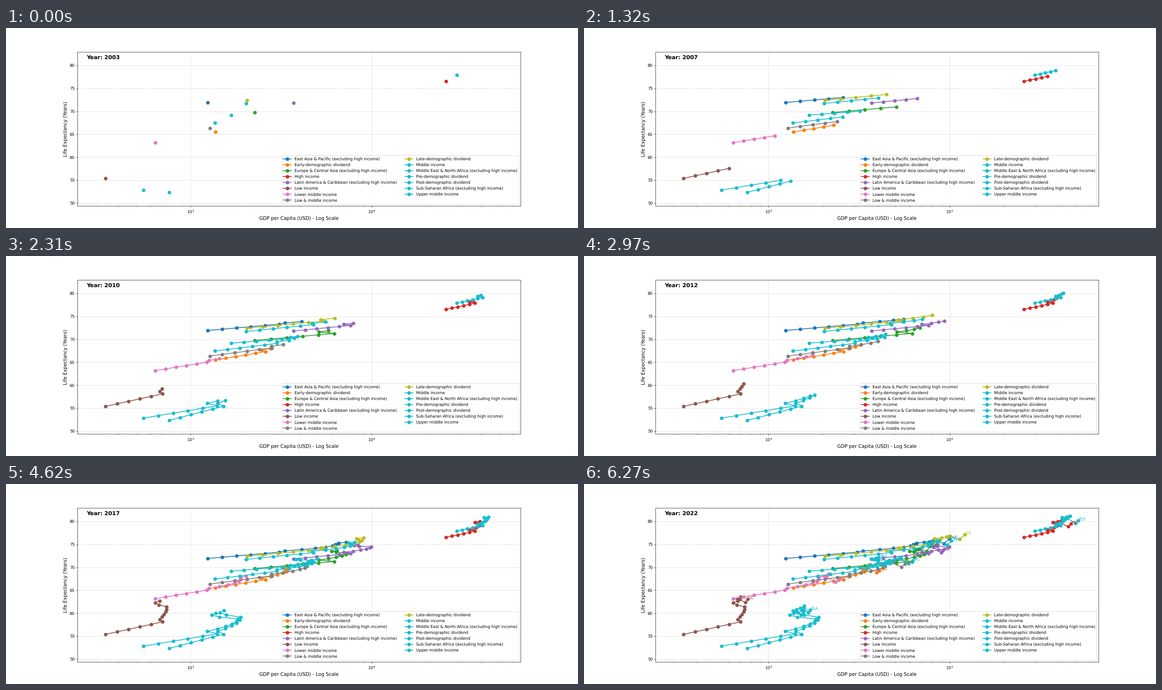
Recreate the animation shown at these times as a matplotlib script. Size 1265 px wide and 443 px high, loop 6.6 s.

```python
import numpy as np
import matplotlib.pyplot as plt
from matplotlib.animation import FuncAnimation

FIRST_YEAR, YEARS = 2003, 20
HEIGHT, DPI = 443, 63.25

REGIONS = {
    "EAP": "East Asia & Pacific (excluding high income)",
    "EAR": "Early-demographic dividend",
    "ECA": "Europe & Central Asia (excluding high income)",
    "HIC": "High income",
    "LAC": "Latin America & Caribbean (excluding high income)",
    "LIC": "Low income",
    "LMC": "Lower middle income",
    "LMY": "Low & middle income",
    "LTE": "Late-demographic dividend",
    "MIC": "Middle income",
    "MNA": "Middle East & North Africa (excluding high income)",
    "PRE": "Pre-demographic dividend",
    "PST": "Post-demographic dividend",
    "SSA": "Sub-Saharan Africa (excluding high income)",
    "UMC": "Upper middle income",
}

# Turning points, in years since the first
CRISIS, REBOUND, PEAK, TROUGH, SLOWDOWN, PANDEMIC, LAST = 5, 6, 11, 13, 16, 17, 19
steps = np.arange(YEARS)


def ease_out(start, end, first, last):
    """Values at every step from first to last, quick at the beginning."""
    s = (np.arange(first, last + 1) - first) / (last - first)
    return start + (end - start) * (1 - (1 - s) ** 1.8)


def track(xs, ys):
    """Yearly stage positions from the turning points of wealth and health."""
    x = np.interp(steps, [0, CRISIS, REBOUND, PEAK, TROUGH, LAST], xs)
    x[REBOUND:PEAK + 1] = ease_out(xs[2], xs[3], REBOUND, PEAK)
    x[PEAK:TROUGH + 1] = ease_out(xs[3], xs[4], PEAK, TROUGH)
    x[TROUGH + 1:SLOWDOWN] += 4
    x[PANDEMIC] -= 13

    # Health gains run straight, slow down, then dip in the pandemic
    start, peak, last = ys
    slope = (peak - start) / PEAK
    slow = peak + slope * (SLOWDOWN - PEAK) + 6
    y = np.interp(steps, [0, PEAK, SLOWDOWN, LAST], [start, peak, slow, last])
    y[PANDEMIC:LAST] += [2, 9]
    return np.column_stack([x, y])


def mix(low, high, x_share, y_share):
    """Path of a combined group lying between two of its parts."""
    return low + (high - low) * [x_share, y_share]


tracks = {
    "EAP": track([446, 604, 617, 728, 736, 808], [165, 134, 121]),
    "EAR": track([463, 574, 565, 623, 613, 653], [230, 190, 192]),
    "ECA": track([550, 726, 692, 755, 720, 765], [187, 153, 138]),
    "HIC": track([973, 1037, 1025, 1049, 1037, 1077], [118, 88, 88]),
    "LAC": track([636, 762, 747, 808, 770, 793], [166, 139, 148]),
    "LIC": track([220, 346, 340, 355, 330, 362], [333, 272, 255]),
    "LMC": track([330, 444, 449, 518, 519, 563], [254, 212, 213]),
    "LTE": track([533, 703, 696, 787, 775, 842], [160, 125, 112]),
    "MNA": track([498, 638, 629, 675, 641, 651], [193, 169, 163]),
    "PRE": track([304, 467, 445, 513, 455, 485], [359, 299, 283]),
    "PST": track([997, 1054, 1043, 1064, 1057, 1093], [104, 77, 81]),
    "SSA": track([361, 481, 468, 519, 473, 500], [364, 295, 279]),
    "UMC": track([531, 680, 677, 765, 757, 812], [167, 134, 126]),
}
tracks["MIC"] = mix(tracks["LMC"], tracks["UMC"], 0.657, 0.5)
tracks["LMY"] = mix(tracks["MIC"], tracks["LIC"], 0.0465, 0.09)

plt.rcParams["text.hinting"] = "none"
fig, ax = plt.subplots(figsize=(20, 7.004), dpi=DPI)
fig.subplots_adjust(right=0.8999)
ax.set_xscale("log")
ax.set_xlim(237.1, 66500)
ax.set_ylim(49.35, 82.93)
ax.set_xlabel("GDP per Capita (USD) - Log Scale", fontsize=12)
ax.set_ylabel("Life Expectancy (Years)", fontsize=12)
ax.grid(True, linestyle="--", alpha=0.7)
year_text = ax.text(0.02, 0.95, "", transform=ax.transAxes,
                    fontsize=14, fontweight="bold")

to_data = ax.transData.inverted()
paths, lines, tags = [], [], []
for i, (code, name) in enumerate(REGIONS.items()):
    color = f"C{min(i, 9)}"
    path = to_data.transform(tracks[code] * [1, -1] + [0.4, HEIGHT])
    line, = ax.plot([], [], marker="o", markersize=8, linewidth=2,
                    color=color, label=name)
    paths.append(path)
    lines.append(line)
    tags.append(ax.text(*path[-1], code, color=color, fontsize=10))

ax.legend(loc="lower right", ncol=2, fontsize=10)


def update(step):
    for path, line, tag in zip(paths, lines, tags):
        line.set_data(path[:step + 1, 0], path[:step + 1, 1])
        tag.set_visible(step == LAST)
    year_text.set_text(f"Year: {FIRST_YEAR + step}")
    return [*lines, *tags, year_text]


anim = FuncAnimation(fig, update, frames=YEARS, interval=330,
                     init_func=lambda: update(0), repeat=True, repeat_delay=0)
plt.show()
```
